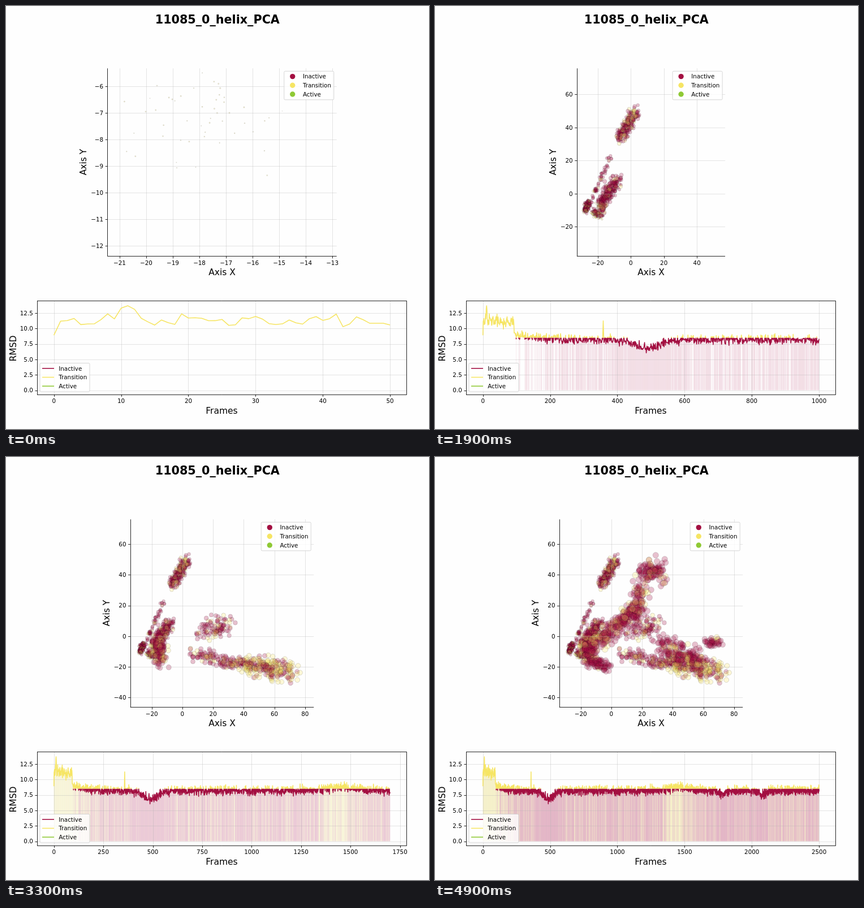
These frames come from a looping animation (748 px wide and 748 px high, 5000 ms). An HTML page with a canvas:

```html
<!DOCTYPE html>
<html lang="en">
<head>
<meta charset="utf-8">
<title>11085_0_helix_PCA</title>
<style>
  html, body { margin: 0; width: 100%; height: 100%; overflow: hidden; background: #fefefe; }
  canvas { display: block; }
</style>
</head>
<body>
<canvas id="stage" width="748" height="748"></canvas>
<script>
const ctx = document.getElementById('stage').getContext('2d');
const STEP = 100, STEPS = 50, PER_STEP = 50, TOTAL = STEPS * PER_STEP;
const INACTIVE = '#a30f41', TRANSITION = '#f6e564', ACTIVE = '#8fc935';
const CLASSES = [['Inactive', INACTIVE], ['Transition', TRANSITION], ['Active', ACTIVE]];
const THRESHOLD = 8.5;
const TICK = 10.35, LABEL = 15.5, THIN = .85, THICK = 1.55;

function makeRandom(seed) {
  return () => {
    seed = (seed + 0x6D2B79F5) | 0;
    let t = Math.imul(seed ^ (seed >>> 15), 1 | seed);
    t = (t + Math.imul(t ^ (t >>> 7), 61 | t)) ^ t;
    return ((t ^ (t >>> 14)) >>> 0) / 4294967296;
  };
}
const rnd = makeRandom(11085);
const noise = () => 2 * (rnd() + rnd() + rnd()) - 3;
const bump = (i, at, width) => Math.exp(-(((i - at) / width) ** 2));

// Each stroke scatters its points along a straight line: last index, ends, spread.
const strokes = [
  { end: 100, from: [-20.5, -6.8], to: [-15.5, -7.4], spread: 1 },
  { end: 235, from: [-23, -11], to: [-18.5, -13], spread: 1.2 },
  { end: 400, from: [-27.3, -10.5], to: [-25.5, -5], spread: .9 },
  { end: 540, from: [-18, -6], to: [-8, 6], spread: 1.6 },
  { end: 600, from: [-25, -7], to: [-12, 23], spread: .7 },
  { end: 850, from: [-7, 33], to: [3, 50], spread: 1.7 },
  { end: 1030, from: [-20, -11], to: [-9, 10], spread: 1.8 },
  { end: 1135, from: [14, 3], to: [29, 9], spread: 3.5 },
  { end: 1300, from: [6, -11], to: [48, -20], spread: 2 },
  { end: 1545, from: [40, -17], to: [71, -24], spread: 3.4 },
  { end: 1740, from: [-16, 0], to: [-14, -16], spread: 2.4 },
  { end: 1810, from: [-13, -16], to: [-1, -21], spread: 1.6 },
  { end: 1850, from: [62, -4], to: [70, -4], spread: 1.4 },
  { end: 2040, from: [33, -6], to: [57, -16], spread: 3.5 },
  { end: 2150, from: [22, 44], to: [31, 41], spread: 3.6 },
  { end: 2250, from: [20, 34], to: [13, 10], spread: 3.2 },
  { end: TOTAL, from: [18, 20], to: [-15, -10], spread: 2.5 }
];

// The upper plot widens as points spread out.
const extents = [
  { end: 50, x: [-21.07, -13.23], y: [-12.06, -5.64] },
  { end: 500, x: [-28.6, -13.2], y: [-18.97, -5.64] },
  { end: 950, x: [-28.6, 6], y: [-18.97, 70.6] },
  { end: 1300, x: [-28.5, 53], y: [-32.6, 70.6] },
  { end: TOTAL, x: [-28.55, 80.25], y: [-40.7, 70.6] }
];
const stageFor = (list, i) => list.find(s => i <= s.end);

function rmsdAt(i) {
  const early = i < 93;
  const trend = early
    ? 11.4 - .5 * i / 93 + 1.9 * bump(i, 11, 2) - 1.8 * bump(i, 0, 1)
    : 8.2 + .9 * Math.exp(-(i - 93) / 50);
  return trend + (early ? .5 : .38) * noise()
    - 1.35 * bump(i, 490, 50) - .6 * bump(i, 1785, 30) - .6 * bump(i, 2075, 35)
    + .6 * bump(i, 1460, 110) + 3.3 * bump(i, 358, 1);
}

const data = Array.from({ length: TOTAL + 1 }, (_, i) => {
  const { from, to, spread } = stageFor(strokes, i);
  const u = rnd(), rmsd = rmsdAt(i);
  const [x, y] = from.map((a, k) => a + (to[k] - a) * u + spread * noise());
  return { x, y, rmsd, inactive: rmsd < THRESHOLD };
});

function ticks(lo, hi, bins) {
  const raw = (hi - lo) / bins;
  const mag = 10 ** Math.floor(Math.log10(raw));
  const step = [1, 2, 2.5, 5, 10].find(m => m * mag >= raw) * mag;
  const out = [];
  for (let v = Math.ceil(lo / step); v * step <= hi; v++) out.push(v * step);
  return out;
}

const snap = v => Math.round(v) + .5;
const signed = v => String(v).replace('-', '\u2212');

function text(str, x, y, size, align = 'center', weight = 'normal') {
  ctx.font = `${weight} ${size}px "DejaVu Sans", sans-serif`;
  ctx.textAlign = align;
  ctx.fillStyle = '#000';
  ctx.fillText(str, x, y);
}

function sideText(str, x, y) {
  ctx.save();
  ctx.translate(x, y);
  ctx.rotate(-Math.PI / 2);
  text(str, 0, 5.5, LABEL);
  ctx.restore();
}

function line(x0, y0, x1, y1, color, width) {
  ctx.strokeStyle = color;
  ctx.lineWidth = width;
  ctx.beginPath();
  ctx.moveTo(x0, y0);
  ctx.lineTo(x1, y1);
  ctx.stroke();
}
const vLine = (x, y0, y1, color) => line(snap(x), y0, snap(x), y1, color, THIN);
const hLine = (y, x0, x1, color) => line(x0, snap(y), x1, snap(y), color, THIN);

function dot(x, y, r, color) {
  ctx.beginPath();
  ctx.arc(x, y, r, 0, 2 * Math.PI);
  ctx.fillStyle = color;
  ctx.fill();
}

function clipped(left, top, right, bottom, paint) {
  ctx.save();
  ctx.beginPath();
  ctx.rect(left, top, right - left, bottom - top);
  ctx.clip();
  paint();
  ctx.restore();
}

function grid(box, xs, ys, px, py) {
  const color = 'rgba(176,176,176,.4)';
  for (const v of xs) vLine(px(v), box.top, box.bottom, color);
  for (const v of ys) hLine(py(v), box.left, box.right, color);
}

function axisMarks(box, xs, ys, px, py, yFormat) {
  for (const v of xs) {
    vLine(px(v), box.bottom, box.bottom + 4, '#000');
    text(signed(v), px(v), box.bottom + 15.2, TICK);
  }
  for (const v of ys) {
    hLine(py(v), box.left - 3.6, box.left, '#000');
    text(yFormat(v), box.left - 7.2, py(v) + 3.8, TICK, 'right');
  }
}

function legend(box, upperRight, drawKey) {
  const w = 88, h = 50.5;
  const x = upperRight ? box.right - 5 - w : box.left + 5;
  const y = upperRight ? box.top + 5 : box.bottom - 5 - h;
  ctx.beginPath();
  ctx.roundRect(x, y, w, h, 2);
  ctx.fillStyle = 'rgba(255,255,255,.8)';
  ctx.fill();
  ctx.strokeStyle = 'rgba(204,204,204,.8)';
  ctx.lineWidth = 1;
  ctx.stroke();
  CLASSES.forEach(([name, color], i) => {
    const cy = y + 9.3 + i * 15.7;
    drawKey(x, cy, color);
    text(name, x + 33.2, cy + 3.8, TICK, 'left');
  });
}

function drawScatter(n) {
  const extent = stageFor(extents, n);
  const [[x0, x1], [y0, y1]] = [extent.x, extent.y].map(([a, b]) => {
    const margin = (b - a) * .05;
    return [a - margin, b + margin];
  });
  const scale = 332 / (y1 - y0), half = (x1 - x0) * scale / 2;
  const box = { left: 382 - half, right: 382 + half, top: 110.3, bottom: 442.3 };
  const px = v => box.left + (v - x0) * scale;
  const py = v => box.bottom - (v - y0) * scale;
  const xs = ticks(x0, x1, Math.min(9, Math.floor(2 * half / 31)));
  const ys = ticks(y0, y1, 9);

  clipped(box.left, box.top, box.right, box.bottom, () => {
    ctx.lineWidth = .5;
    ctx.strokeStyle = '#000';
    for (let i = 0; i <= n; i++) {
      const { x, y, inactive } = data[i];
      ctx.globalAlpha = .26;
      dot(px(x), py(y), .35 + .105 * Math.sqrt(i), inactive ? INACTIVE : TRANSITION);
      ctx.stroke();
    }
  });
  grid(box, xs, ys, px, py);
  vLine(box.left, box.top, box.bottom, '#000');
  hLine(box.bottom, box.left, box.right, '#000');
  axisMarks(box, xs, ys, px, py, signed);
  text('Axis X', 382, 476, LABEL);
  sideText('Axis Y', box.left - 42.7, 276);
  legend(box, n === PER_STEP || n > 500, (x, y, color) => dot(x + 15, y, 4.7, color));
}

function drawCurve(n) {
  const box = { left: 55, right: 708.8, top: 521.5, bottom: 687 };
  const px = v => 84.7 + v / n * 594.4;
  const py = v => 679.5 - v * 10.92;
  const xs = ticks(-.05 * n, 1.05 * n, 9);
  const ys = [0, 2.5, 5, 7.5, 10, 12.5];
  const showAll = n >= 1400;

  ctx.globalAlpha = .07;
  for (let i = 0; i <= n; i++) {
    const { rmsd, inactive } = data[i];
    if (showAll || inactive) line(px(i), py(0), px(i), py(rmsd), inactive ? INACTIVE : '#dcd65a', 1.1);
  }
  ctx.globalAlpha = 1;
  grid(box, xs, ys, px, py);

  // The curve changes colour where it crosses the threshold.
  const curve = new Path2D();
  for (let i = 0; i <= n; i++) curve.lineTo(px(i), py(data[i].rmsd));
  const band = (top, bottom, color) => clipped(box.left, top, box.right, bottom, () => {
    ctx.lineJoin = 'round';
    ctx.lineWidth = THICK;
    ctx.strokeStyle = color;
    ctx.stroke(curve);
  });
  band(box.top, py(THRESHOLD), TRANSITION);
  band(py(THRESHOLD), box.bottom, INACTIVE);

  for (const x of [box.left - .5, box.right - .5]) vLine(x, box.top, box.bottom, '#000');
  for (const y of [box.top - .5, box.bottom - .5]) hLine(y, box.left, box.right, '#000');
  axisMarks(box, xs, ys, px, py, v => v.toFixed(1));
  text('Frames', 381.5, 721, LABEL);
  sideText('RMSD', 12.8, 605.5);
  legend(box, n > PER_STEP && n < 1000, (x, y, color) => line(x + 4, y, x + 25, y, color, THICK));
}

function draw(step) {
  const n = (step + 1) * PER_STEP;
  ctx.fillStyle = '#fefefe';
  ctx.fillRect(0, 0, 748, 748);
  text('11085_0_helix_PCA', 373.8, 31.3, 20.7, 'center', 'bold');
  drawScatter(n);
  drawCurve(n);
}

let shown = -1;
const start = performance.now();
function tick() {
  const step = Math.floor((performance.now() - start) / STEP) % STEPS;
  if (step !== shown) draw(shown = step);
  requestAnimationFrame(tick);
}
tick();
</script>
</body>
</html>
```
